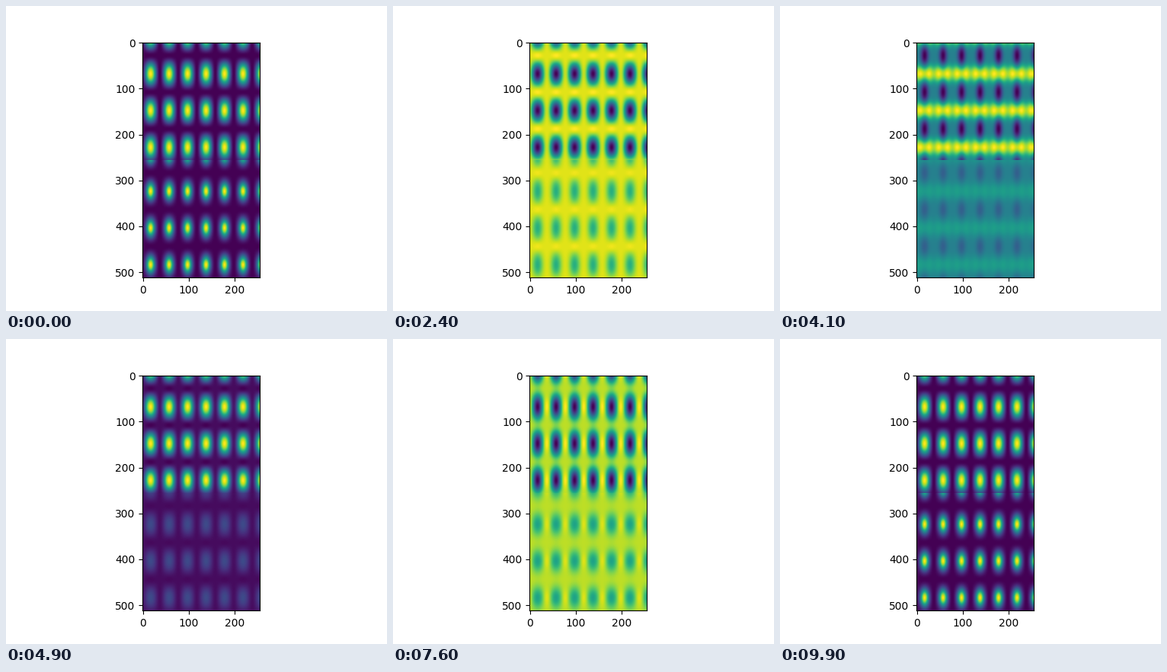
Write a matplotlib script that moves like this. It is 500 px wide and 400 px high and loops after 10 s.

```python
import numpy as np
import matplotlib.pyplot as plt
from matplotlib.animation import FuncAnimation

SIZE = 256
FRAMES = 100

axis = np.linspace(-10, 10, SIZE)
x, y = np.meshgrid(axis, axis)
u = (1 + np.sin(2 * x)) / 2
v = (1 + np.sin(y)) / 2


def field(angle):
    """Rotate (u, v), then stack the plain and the damped product."""
    a = u * np.cos(angle) - v * np.sin(angle)
    b = u * np.sin(angle) + v * np.cos(angle)
    product = a * b
    damped = product / (1 + (1 - a) + (1 - b))
    return np.concatenate([product, damped])


fig, ax = plt.subplots(figsize=(5, 4), dpi=100)
image = ax.imshow(field(0), cmap="viridis")
angles = np.linspace(0, 2 * np.pi, FRAMES)


def update(i):
    image.set_data(field(angles[i]))
    image.autoscale()
    return [image]


anim = FuncAnimation(fig, update, frames=FRAMES, interval=100,
                     repeat=True, repeat_delay=0)
plt.show()
```
